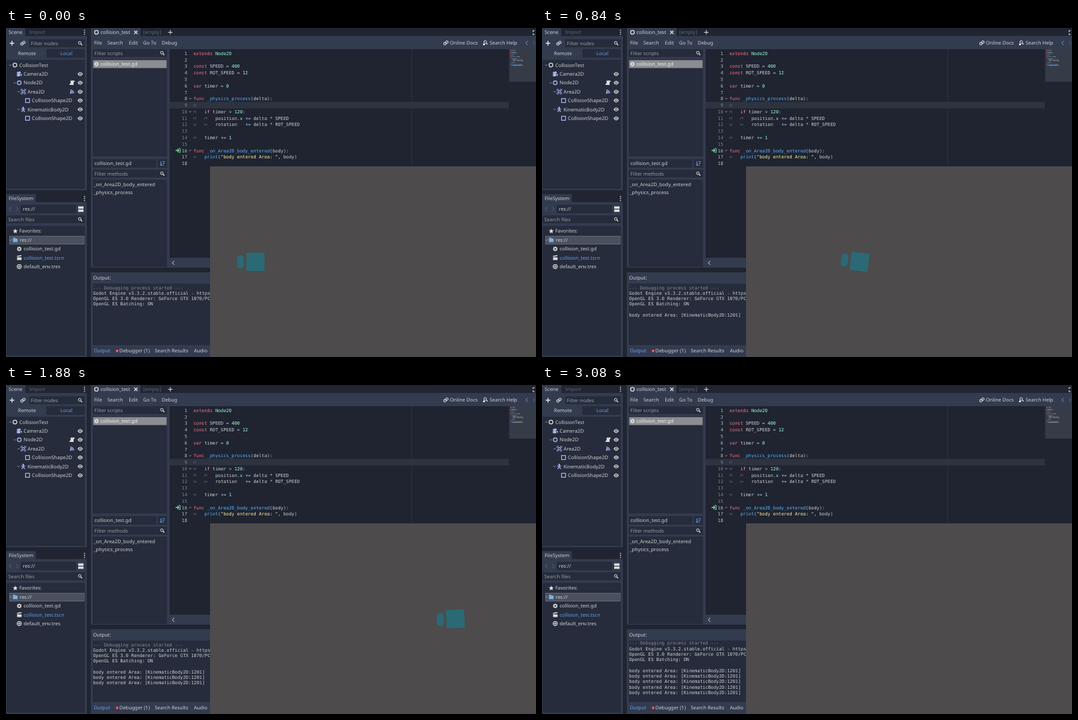
Animation, 800 px wide and 497 px high, one loop 3.12 s. Source, as an HTML page with a canvas:

```html
<!DOCTYPE html>
<html lang="en">
<head>
<meta charset="utf-8">
<title>Collision test</title>
<style>
html, body { margin: 0; width: 100%; height: 100%; overflow: hidden; background: #202531; }
canvas { display: block; }
</style>
</head>
<body>
<canvas id="stage" width="800" height="497"></canvas>
<script>
const LOOP = 3120, STEP = 40;
const UI = '7.45px "Noto Sans", "Open Sans", sans-serif';
const MONO = '6.84px "DejaVu Sans Mono", "Liberation Mono", monospace';
const BACK = '#202531', BASE = '#333b4f', PANEL = '#262c3b', DARK = '#1f2430';
const TEXT = '#cdcfd2', DIM = '#969ba5', FAINT = '#5e6575', BLUE = '#699ce8', ICON = '#e0e0e0';
const NODE = '#a5b7f3';
const KEY = '#ff7085', FLOW = '#ff8ccc', FUNC = '#57b3ff', SYM = '#abc9ff';
const NUM = '#a1ffe0', TYPE = '#8fffdb', STR = '#ffeda1', MEMBER = '#bce0ff';

const stage = document.getElementById('stage').getContext('2d');
const backdrop = document.createElement('canvas');
backdrop.width = 800;
backdrop.height = 497;
let c = backdrop.getContext('2d');

function box(x, y, x2, y2, color) {
  c.fillStyle = color;
  c.fillRect(x, y, x2 - x, y2 - y);
}

function frame(x, y, x2, y2, color, width = 1) {
  c.strokeStyle = color;
  c.lineWidth = width;
  c.strokeRect(x, y, x2 - x, y2 - y);
}

// y is the middle of the text row
function label(text, x, y, color = TEXT, font = UI) {
  c.font = font;
  c.textRendering = 'geometricPrecision';
  c.fillStyle = color;
  c.fillText(text, x, y + 2.6);
  return c.measureText(text).width;
}

function path(points, color = ICON, width = 1) {
  c.strokeStyle = color;
  c.lineWidth = width;
  c.beginPath();
  for (let i = 0; i < points.length; i += 2) c.lineTo(points[i], points[i + 1]);
  c.stroke();
}

function ring(x, y, r, color = ICON, width = 1.2) {
  c.strokeStyle = color;
  c.lineWidth = width;
  c.beginPath();
  c.arc(x, y, r, 0, 7);
  c.stroke();
}

function dot(x, y, r, color = ICON) {
  c.fillStyle = color;
  c.beginPath();
  c.arc(x, y, r, 0, 7);
  c.fill();
}

function lens(x, y) {
  ring(x - 0.7, y - 0.7, 2, ICON, 1);
  path([x + 0.8, y + 0.8, x + 3, y + 3], ICON, 1.3);
}

function cross(x, y, r, turn, width = 1.3) {
  const a = turn ? r * 0.75 : 0, b = turn ? a : r;
  path([x - b, y - a, x + b, y + a], ICON, width);
  path([x + a, y - b, x - a, y + b], ICON, width);
}

function eye(x, y) {
  c.fillStyle = ICON;
  c.beginPath();
  c.moveTo(x - 4, y);
  c.quadraticCurveTo(x, y - 6, x + 4, y);
  c.quadraticCurveTo(x, y + 6, x - 4, y);
  c.fill();
  dot(x, y, 1.9, PANEL);
  dot(x, y, 1);
}

function gear(x, y) {
  ring(x, y, 2, ICON, 1.5);
  for (let i = 0; i < 8; i++) {
    const u = Math.cos(i * Math.PI / 4), v = Math.sin(i * Math.PI / 4);
    path([x + u * 2, y + v * 2, x + u * 3.6, y + v * 3.6], ICON, 1.1);
  }
}

function link(x, y) {
  ring(x - 1.5, y + 1.2, 1.8, ICON, 1.1);
  ring(x + 1.6, y - 1.2, 1.8, ICON, 1.1);
}

function more(x, y) {
  for (let i = -1; i < 2; i++) dot(x, y + i * 3.1, 0.9, TEXT);
}

function fold(x, y, color = DIM) {
  path([x - 1.6, y - 0.8, x, y + 0.9, x + 1.6, y - 0.8], color, 0.9);
}

function chevron(x, y, dir, color) {
  path([x - dir * 1.4, y - 3, x + dir * 1.4, y, x - dir * 1.4, y + 3], color, 1);
}

function search(text, x, y, x2, y2) {
  box(x, y, x2, y2, PANEL);
  label(text, x + 2.5, (y + y2) / 2, DIM);
  lens(x2 - 7, (y + y2) / 2);
}

function sceneDock() {
  box(0, 0, 29, 13, BASE);
  box(0, 12, 122, 245, BASE);
  label('Scene', 4, 6.5);
  label('Import', 35, 6.5, FAINT);
  more(118.5, 6.5);
  cross(9, 23, 3.4, false, 1.5);
  link(25.5, 23);
  search('Filter nodes', 35, 17, 119, 29);
  box(61, 32, 119, 45, PANEL);
  label('Remote', 18, 38.5);
  label('Local', 82, 38.5, BLUE);
  box(1, 48, 119, 243, PANEL);

  const rows = [['CollisionTest', 20], ['Camera2D', 26.5], ['Node2D', 26.5], ['Area2D', 32.5],
    ['CollisionShape2D', 39], ['KinematicBody2D', 32.5], ['CollisionShape2D', 39]];
  rows.forEach(([name, x], i) => {
    const y = 56 + i * 13.4;
    label(name, x, y);
    if (i) eye(112, y);
    if (i === 0 || i === 2) ring(x - 6.5, y, 2.8, i ? NODE : ICON, 1.3);
    if (i === 4 || i === 6) frame(x - 9.5, y - 3, x - 3.5, y + 3, NODE, 1.2);
    if ([0, 2, 3, 5].includes(i)) fold(x - 13.5, y);
  });
  // camera
  box(16.5, 69, 21.5, 73, NODE);
  dot(18, 67.5, 1.6, NODE);
  dot(20.5, 67.3, 1.8, NODE);
  path([21.5, 71, 23.5, 69.5, 23.5, 72.5], NODE);
  // area
  frame(24.6, 94.6, 27.8, 97.8, NODE, 1.1);
  for (const [u, v] of [[-1, -1], [1, -1], [-1, 1], [1, 1]])
    path([26.2 + u * 3.5, 96.2 + v, 26.2 + u * 3.5, 96.2 + v * 3.5, 26.2 + u, 96.2 + v * 3.5], NODE, 0.9);
  // body
  dot(26, 120.3, 1.3, NODE);
  path([22.8, 122.5, 29.2, 122.5], NODE);
  path([26, 121, 26, 124, 23.5, 126.5], NODE, 1.4);
  path([26, 124, 28.5, 126.5], NODE, 1.4);
  // script and signal
  box(97.5, 79.5, 102, 86, ICON);
  box(96, 84, 100, 86, ICON);
  box(101, 79.5, 103.5, 81.5, ICON);
  dot(97.5, 98.3, 1);
  for (const r of [3, 5.2]) {
    c.beginPath();
    c.arc(97, 98.8, r, -Math.PI / 2, 0);
    c.stroke();
  }
}

function fileDock() {
  box(0, 251, 45, 264, BASE);
  box(0, 263, 122, 497, BASE);
  label('FileSystem', 4, 257.3);
  more(118.5, 257.5);
  chevron(6.5, 273.5, -1, FAINT);
  chevron(17, 273.5, 1, FAINT);
  box(22, 267, 106, 280, PANEL);
  label('res://', 25.5, 273.5);
  box(109, 269.5, 117, 273, ICON);
  box(109, 274.2, 117, 277.7, ICON);
  search('Search files', 1, 283, 119, 295);
  box(1, 299, 119, 495, PANEL);
  box(5, 314, 118, 327, '#4a505e');
  frame(5.5, 314.5, 118, 326.5, '#6b717e', 0.7);
  c.fillStyle = ICON;
  c.beginPath();
  for (let i = 0; i < 10; i++) {
    const r = i % 2 ? 1.7 : 4, a = i * Math.PI / 5 - Math.PI / 2;
    c.lineTo(14 + r * Math.cos(a), 307 + r * Math.sin(a));
  }
  c.fill();
  label('Favorites:', 20, 306.8);
  fold(7, 320.3);
  box(10.5, 318, 17.5, 323.5, '#7faee0');
  box(10.5, 316.8, 14, 318, '#7faee0');
  label('res://', 20.5, 320.2);
  gear(20, 333.7);
  label('collision_test.gd', 26.5, 333.6);
  box(16.7, 346.5, 23.5, 350.5, ICON);
  path([16.7, 345, 23.3, 343.7], ICON, 1.5);
  label('collision_test.tscn', 26.5, 347, BLUE);
  ring(20, 360.3, 3.1, ICON, 1.1);
  path([17, 360.3, 23, 360.3], ICON, 0.9);
  path([20, 357.2, 20, 363.4], ICON, 0.9);
  label('default_env.tres', 26.5, 360.2);
}

function scriptPanel() {
  box(128, 0, 203, 13, BASE);
  box(128, 12, 800, 362, BASE);
  ring(136.5, 6.5, 2.8, ICON, 1.3);
  label('collision_test', 142.5, 6.5);
  cross(196, 6.5, 3.3, true);
  label('[empty]', 207, 6.5, FAINT);
  cross(248, 6.5, 3.3, false, 1);
  path([795.5, 6, 795.5, 4, 798, 4], ICON, 1);
  path([795.5, 8, 795.5, 10, 798, 10], ICON, 1);

  const menu = { File: 133, Search: 153, Edit: 185.5, 'Go To': 207, Debug: 235 };
  for (const name in menu) label(name, menu[name], 22.5);
  link(664, 22.5);
  label('Online Docs', 670, 22.5);
  lens(724, 21.8);
  box(720, 23.5, 723, 26, ICON);
  label('Search Help', 730, 22.5);
  chevron(786, 22.5, -1, DIM);
  chevron(797, 22.5, 1, FAINT);

  search('Filter scripts', 131, 32, 243, 44);
  box(131, 47, 243, 194, PANEL);
  box(131.5, 48.5, 242.5, 60.5, '#8b8d92');
  gear(136.5, 54.5);
  label('collision_test.gd', 142.5, 54.3, '#f0f0f0');
  box(131, 198, 227, 211, PANEL);
  label('collision_test.gd', 133.5, 204.5);
  box(229, 198, 243, 211, PANEL);
  path([234, 201.5, 234, 208], BLUE, 1.2);
  path([232.5, 206.5, 234, 208, 235.5, 206.5], BLUE, 1);
  for (let i = 0; i < 3; i++) path([236.5, 202 + i * 2.7, 240 - i, 202 + i * 2.7], BLUE, 1.1);
  search('Filter methods', 131, 214, 243, 226);
  box(131, 229, 243, 361, PANEL);
  label('_on_Area2D_body_entered', 132.3, 236.4);
  label('_physics_process', 132.3, 248.6);
}

const program = {
  1: [0, 'extends ', KEY, 'Node2D', TYPE],
  3: [0, 'const ', KEY, 'SPEED ', TEXT, '= ', SYM, '400', NUM],
  4: [0, 'const ', KEY, 'ROT_SPEED ', TEXT, '= ', SYM, '12', NUM],
  6: [0, 'var ', KEY, 'timer ', TEXT, '= ', SYM, '0', NUM],
  8: [0, 'func ', KEY, '_physics_process', FUNC, '(', SYM, 'delta', TEXT, '):', SYM],
  9: [1],
  10: [1, 'if ', FLOW, 'timer ', TEXT, '> ', SYM, '120', NUM, ':', SYM],
  11: [2, 'position', TEXT, '.', SYM, 'x ', MEMBER, '+= ', SYM, 'delta ', TEXT, '* ', SYM, 'SPEED', TEXT],
  12: [2, 'rotation   ', TEXT, '+= ', SYM, 'delta ', TEXT, '* ', SYM, 'ROT_SPEED', TEXT],
  14: [1, 'timer ', TEXT, '+= ', SYM, '1', NUM],
  16: [0, 'func ', KEY, '_on_Area2D_body_entered', FUNC, '(', SYM, 'body', TEXT, '):', SYM],
  17: [1, 'print', FUNC, '(', SYM, '"body entered Area: "', STR, ', ', SYM, 'body', TEXT, ')', SYM]
};

function codeEditor() {
  box(247, 32, 800, 347, DARK);
  box(247, 111.5, 759, 121.5, '#2e3340');
  box(612, 32, 613, 209, '#2d323f');
  box(759.5, 32, 800, 81, '#363b48');
  for (let n = 1; n <= 18; n++) {
    const y = 38.3 + (n - 1) * 9.78;
    c.textAlign = 'right';
    label(n, 273.5, y, n > 8 && n < 16 ? '#7b808b' : '#b4b8be', MONO);
    c.textAlign = 'left';
    const [tabs = 0, ...parts] = program[n] || [];
    for (let k = 0; k < tabs; k++) {
      const x = 283.5 + k * 16.47;
      path([x, y - 1.5, x, y + 2], '#535a69', 0.8);
      path([x, y, x + 3, y], '#535a69', 0.8);
      path([x + 3, y - 1.5, x + 3, y + 2], '#535a69', 0.8);
    }
    let x = 283 + tabs * 16.47, mini = 761 + tabs * 2;
    for (let i = 0; i < parts.length; i += 2) {
      x += label(parts[i], x, y, parts[i + 1], MONO);
      const w = parts[i].trim().length * 0.52;
      c.globalAlpha = 0.5;
      box(mini, 31.5 + n * 1.45, mini + w, 32.4 + n * 1.45, parts[i + 1]);
      c.globalAlpha = 1;
      mini += parts[i].length * 0.52;
    }
    if (n === 8 || n === 10 || n === 16) fold(278, y);
  }
  path([256, 185, 261, 185], '#8eefc0', 1.3);
  path([258.8, 182.7, 261, 185, 258.8, 187.3], '#8eefc0', 1.1);
  path([260.5, 182, 263, 182, 263, 188, 260.5, 188], '#8eefc0', 0.9);
  chevron(252.5, 354.7, -1, ICON);
}

function bottomPanel() {
  box(128, 369, 308, 497, BASE);
  label('Output:', 131.5, 377.2);
  box(131, 386, 308, 479, PANEL);
  label('Output', 132.5, 487.6, BLUE);
  dot(167.7, 487.7, 2, '#ff5d5d');
  label('Debugger (1)', 171, 487.6);
  label('Search Results', 224.5, 487.6);
  label('Audio', 283.7, 487.6);
}

const log = ['--- Debugging process started ---',
  'Godot Engine v3.3.2.stable.official - https',
  'OpenGL ES 3.0 Renderer: GeForce GTX 1070/PC',
  'OpenGL ES Batching: ON', ''];

function drawLog(t) {
  const hits = Math.max(0, Math.min(5, 1 + Math.floor((t - 604) / 515)));
  const lines = log.concat(Array(hits).fill('body entered Area: [KinematicBody2D:1201]'));
  const top = hits === 5 ? 389.7 : 391.9;
  c.save();
  c.beginPath();
  c.rect(131, 386, 177, 93);
  c.clip();
  lines.forEach((s, i) => label(s, 131.5, top + i * 8.28, i ? TEXT : '#868b95', MONO));
  c.restore();
}

function drawGame(t) {
  box(308, 209, 800, 497, '#4d4b4c');
  // physics runs at 60 ticks a second
  const ticks = Math.max(0, Math.floor(t * 0.06 - 17.9));
  c.save();
  c.translate(376.5 + ticks * 3.21, 353.3);
  c.rotate(ticks * 12 / 60);
  c.fillStyle = '#2b6974';
  c.beginPath();
  c.roundRect(-13.8, -13.8, 27.6, 27.6, 0.8);
  c.roundRect(-28, -10, 10.6, 20, 5.3);
  c.fill();
  c.restore();
}

box(0, 0, 800, 497, BACK);
sceneDock();
fileDock();
scriptPanel();
codeEditor();
bottomPanel();
c = stage;

const start = performance.now();
function tick(now) {
  const t = Math.floor(Math.max(0, now - start) % LOOP / STEP) * STEP;
  c.drawImage(backdrop, 0, 0);
  drawLog(t);
  drawGame(t);
  requestAnimationFrame(tick);
}
tick(start);
</script>
</body>
</html>
```
